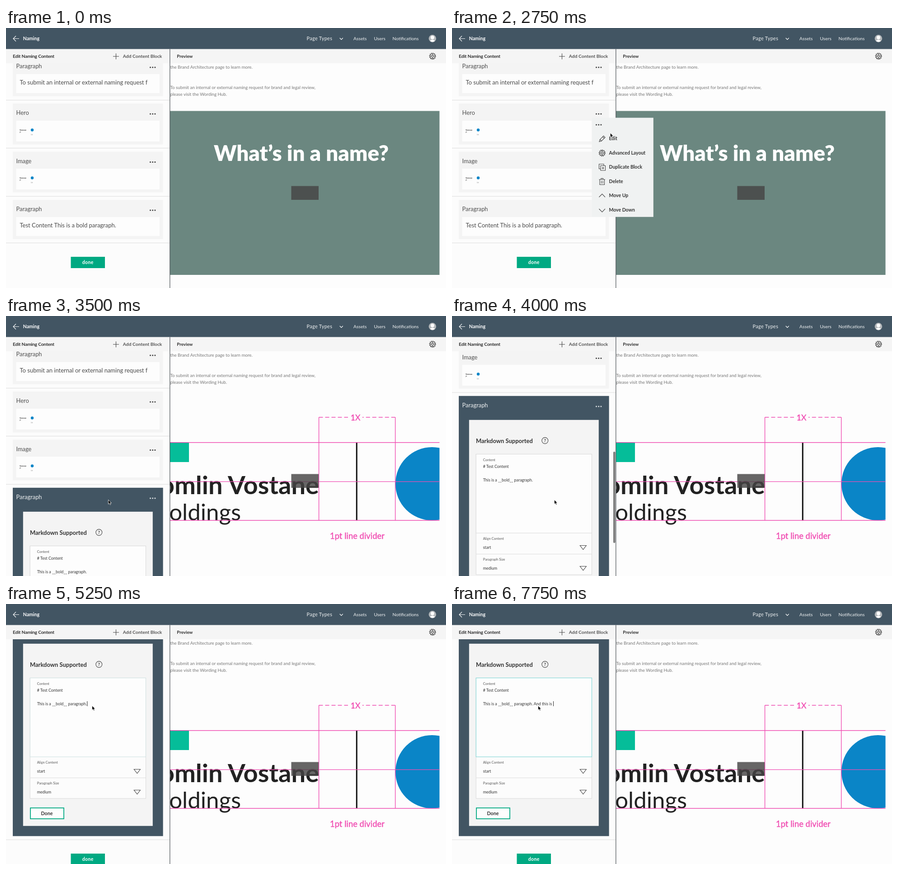
Animation, 974 px wide and 575 px high, one loop 8 s. Source, as an HTML page:

```html
<!DOCTYPE html>
<html lang="en">
<head>
<meta charset="utf-8">
<title>Content editor</title>
<style>
html, body { margin: 0; width: 100%; height: 100%; overflow: hidden; background: #fdfdfd; }
svg { display: block; width: 974px; height: 575px; font-family: Lato, "Open Sans", sans-serif; }
text { fill: #3d3d3d; white-space: pre; }
.nav { font-size: 10.3px; fill: #f1f3f4; }
.b { font-weight: 700; }
.title { font-size: 12.9px; fill: #505050; }
.body { font-size: 13px; fill: #4a4a4a; }
.copy { font-size: 9.75px; fill: #777; }
.label { font-size: 7.6px; fill: #555; }
.field { font-size: 8.9px; fill: #333; }
.item { font-size: 10.5px; font-weight: 700; fill: #333; }
.line { fill: none; stroke: #444; stroke-width: 1.1; }
.pink { fill: none; stroke: #f04db2; stroke-width: 1.4; }
.note { fill: #f04db2; stroke: #f04db2; stroke-width: .4; }
.rule { stroke: #dcdcdc; }
</style>
</head>
<body>
<svg viewBox="0 0 974 575">
<defs>
  <clipPath id="leftClip"><rect y="78" width="362" height="497"/></clipPath>
  <clipPath id="heroClip"><rect x="363" y="183" width="596.6" height="363"/></clipPath>
  <g id="dots"><circle cx="-5.2" r="1.6"/><circle r="1.6"/><circle cx="5.2" r="1.6"/></g>
  <g id="gear" class="line" stroke-width="1">
    <circle r="5.6"/><circle r="2.2"/>
    <circle r="6.9" style="stroke-width:1.5" stroke-dasharray="1.8 1.81"/>
    <path d="M-5.4 0H-2.2M2.2 0H5.4M0-5.4V-2.2M0 2.2V5.4"/>
  </g>
  <g id="thumb">
    <rect x="22.5" width="317.5" height="46" fill="#fdfdfd"/>
    <text x="30" y="22" class="b" font-size="4.2" style="fill:#222">Vostane</text>
    <text x="30" y="25.5" font-size="3.2" style="fill:#222">gs</text>
    <circle cx="58" cy="20.5" r="3.2" fill="#0a85c7"/>
    <text x="55" y="32" font-size="3.4" style="fill:#777">Lin</text>
  </g>
  <path id="drop" class="line" d="M-7-4.5H7L0 4.5Z"/>
</defs>

<rect width="974" height="575" fill="#fdfdfd"/>

<!-- preview pane -->
<text x="363.5" y="89.5" class="copy">the Brand Architecture page to learn more.</text>
<text x="363.5" y="135" class="copy">To submit an internal or external naming request for brand and legal review,</text>
<text x="363.5" y="150" class="copy">please visit the Wording Hub.</text>
<g clip-path="url(#heroClip)">
  <g id="hero">
    <rect x="363" y="183.5" width="597" height="362.5" fill="#6b8780"/>
    <text x="460" y="294" font-size="47.6" font-weight="900" style="fill:#fff">What’s in a name?</text>
  </g>
  <g id="diagram">
    <rect x="363" y="280" width="42" height="43" fill="#05bd99"/>
    <text x="693" y="394" class="b" font-size="56" text-anchor="end" style="fill:#222">Bromlin Vostane</text>
    <text x="520" y="452" font-size="51" text-anchor="end" style="fill:#222">Holdings</text>
    <circle cx="943" cy="371" r="81" fill="#0a85c7"/>
    <path d="M776.3 280V452" stroke="#111" stroke-width="3"/>
    <path class="pink" d="M363 279.8H960M363 366.4H960M363 452H960M692.6 224V452M861.7 224V452"/>
    <path class="pink" stroke-dasharray="9 5" d="M692.5 224H757M861.8 224H789"/>
    <text x="773.5" y="231" font-size="17.7" text-anchor="middle" class="note" style="fill:#f04db2">1X</text>
    <text x="717" y="493" font-size="18.4" class="note" style="fill:#f04db2">1pt line divider</text>
  </g>
  <rect x="631.5" y="349.5" width="60.5" height="30.5" fill="rgb(70,68,68)" fill-opacity=".81"/>
</g>

<!-- block list -->
<g clip-path="url(#leftClip)">
  <rect width="362" height="575" fill="#fcfcfc"/>
  <g id="list">
    <g fill="#f4f4f4">
      <rect x="15" y="60" width="332.6" height="91"/>
      <rect x="15" y="167" width="332.6" height="90.5"/>
      <rect x="15" y="273.5" width="332.6" height="90"/>
    </g>
    <path class="rule" d="M0 159.5H362M0 265.7H362M0 372.2H362"/>
    <rect x="22.5" y="102" width="317.5" height="42" fill="#fdfdfd"/>
    <text x="22.5" y="89" class="title">Paragraph</text>
    <text x="30.5" y="124.7" class="body">To submit an internal or external naming request f</text>
    <text x="22.5" y="192" class="title">Hero</text>
    <text x="22.5" y="298.5" class="title">Image</text>
    <use href="#thumb" y="205"/>
    <use href="#thumb" y="311"/>
    <g fill="#444">
      <use href="#dots" x="324.7" y="87"/>
      <use href="#dots" x="324.7" y="190"/>
      <use href="#dots" x="324.7" y="296.5"/>
    </g>

    <g id="closed">
      <rect x="15" y="380" width="332.6" height="87" fill="#f4f4f4"/>
      <rect x="22.5" y="418" width="317.5" height="42" fill="#fdfdfd"/>
      <text x="22.5" y="405" class="title">Paragraph</text>
      <text x="30.5" y="440.5" class="body">Test Content This is a bold paragraph.</text>
      <use href="#dots" x="324.7" y="403" fill="#444"/>
    </g>

    <g id="open">
      <rect x="15" y="379.8" width="332.6" height="478.5" fill="#425563"/>
      <text x="22.5" y="405" class="title" style="fill:#eef0f1">Paragraph</text>
      <use href="#dots" x="324.7" y="403" fill="#d5dadd"/>
      <rect x="37.8" y="432.8" width="287" height="403" fill="#f4f4f4"/>
      <text x="53" y="484" class="b" font-size="12.95" style="fill:#333">Markdown Supported</text>
      <circle class="line" cx="205.8" cy="478.5" r="6.9" stroke-width="1.3"/>
      <text x="205.8" y="482.2" class="b" font-size="10" text-anchor="middle">?</text>
      <rect x="53.2" y="508.5" width="256.3" height="266.5" fill="#fcfcfc" stroke="#d9d9d9"/>
      <path class="rule" d="M53.5 729.5H309.5"/>
      <rect id="area" x="53.2" y="508.5" width="256.3" height="174.5" fill="#fdfdfd"/>
      <text x="68.7" y="523.5" class="label">Content</text>
      <text x="68.7" y="538.7" class="field">#&#160;Test Content</text>
      <text id="typed" x="68.7" y="569" class="field"></text>
      <rect id="caret" y="560" width="1" height="11" fill="#222"/>
      <text x="68.7" y="698" class="label">Align Content</text>
      <text x="68.7" y="717.5" class="field">start</text>
      <text x="68.7" y="744" class="label">Paragraph Size</text>
      <text x="68.7" y="763.5" class="field">medium</text>
      <use href="#drop" x="290.3" y="715"/>
      <use href="#drop" x="290.3" y="761"/>
      <rect x="54" y="796" width="74" height="24" fill="#fdfdfd" stroke="#00a982" stroke-width="1.8"/>
      <text x="90.5" y="812" class="b" font-size="10.7" text-anchor="middle" style="fill:#333">Done</text>
    </g>

    <g id="foot">
      <path class="rule" d="M0 475.3H362"/>
      <rect x="143.5" y="506" width="75.5" height="25" fill="#00a982"/>
      <text x="181.2" y="522.3" class="b" font-size="10.6" letter-spacing=".3" text-anchor="middle" style="fill:#fff">done</text>
    </g>
  </g>
  <rect id="bar" x="357" width="4.5" height="202" rx="2.2" fill="#7c7c7c"/>
</g>

<!-- top bars -->
<rect y="46" width="974" height="32" fill="#f5f5f5"/>
<rect width="974" height="46.5" fill="#425563"/>
<path d="M362.8 46.5V575" stroke="#555b60" stroke-width="1.3"/>
<path d="M29 23.5H16M22 17.5L16 23.5L22 29.5" fill="none" stroke="#f1f3f4" stroke-width="1.2"/>
<text x="37.8" y="27" class="b" font-size="10.5" style="fill:#fff">Naming</text>
<text x="665.5" y="27.3" class="nav" style="font-size:11px" letter-spacing=".3">Page Types</text>
<path d="M738.8 22L742.3 25.6L745.8 22" fill="none" stroke="#fff" stroke-width="1.2"/>
<text x="769" y="27.2" class="nav">Assets</text>
<text x="814.5" y="27.2" class="nav">Users</text>
<text x="855.5" y="27.2" class="nav">Notifications</text>
<circle cx="944" cy="23.3" r="8.2" fill="#b4b8bb"/>
<circle cx="944" cy="21" r="3.9" fill="#fff"/>
<path d="M938.6 28.6Q944 22.8 949.4 28.6Q944 33 938.6 28.6Z" fill="#fff"/>
<text x="15" y="66.3" class="b" font-size="10.3" letter-spacing="-.2" style="fill:#2e2e2e">Edit Naming Content</text>
<path class="line" d="M237 62.7H250M243.5 56.2V69.2"/>
<text x="258.8" y="66" class="b" font-size="10.3" style="fill:#555">Add Content Block</text>
<text x="378.3" y="66.3" class="b" font-size="9.75" style="fill:#2e2e2e">Preview</text>
<use href="#gear" x="944.3" y="62.3"/>

<!-- block menu -->
<g id="menu">
  <rect x="309.5" y="198.5" width="136.3" height="219.3" fill="#f0f2f2"/>
  <use href="#dots" x="324.7" y="214" fill="#444"/>
  <path class="line" d="M326 251.5L327.5 246.5L335.5 238.5L339 242L331 250ZM333.5 240.5L337 244M327.5 246.5L331 250"/>
  <use href="#gear" x="332.3" y="276.5"/>
  <path class="line" d="M329 311.5H325.5V301H336V304.5M329 304.5H339.5V315H329ZM334.2 307V312.5M331.5 309.8H337"/>
  <path class="line" d="M325.5 335H339M330 335V332.5H334.5V335M327 335V346.5H337.5V335M330.5 338V344M334 338V344"/>
  <path class="line" d="M325.5 374L332.3 367L339 374M325.5 400L332.3 407L339 400"/>
  <g id="items"></g>
</g>

<path id="cursor" d="M0 0V9.6L2.2 7.6L3.8 11L5.5 10.2L4 7H6.9Z" fill="#000" stroke="#fff" stroke-width=".8"/>
</svg>
<script>
const LOOP = 8000, STEP = 250;
const $ = id => document.getElementById(id);
const show = (id, on) => { $(id).style.display = on ? '' : 'none'; };

['Edit', 'Advanced Layout', 'Duplicate Block', 'Delete', 'Move Up', 'Move Down'].forEach((label, i) => {
  const item = document.createElementNS('http://www.w3.org/2000/svg', 'text');
  item.setAttribute('class', 'item');
  item.setAttribute('x', 347.5);
  item.setAttribute('y', 248 + i * 31.5);
  item.textContent = label;
  $('items').append(item);
});

// Each key: time, then values
const path = [
  [500, 233, 418], [1000, 295, 408], [1500, 324, 402], [1750, 320.8, 408.8],
  [2250, 340, 305], [2750, 350.3, 232], [3250, 350.3, 232], [3500, 226.5, 406.5],
  [4500, 226.5, 406.5], [5000, 190.6, 225], [8000, 190.6, 225]
];
const scroll = [[3500, 0], [3750, 75], [4000, 203], [4250, 275], [4500, 325], [4750, 345]];
const typing = [[5500, 0], [6750, 10], [7000, 11], [7250, 11], [7500, 12], [7750, 13]];

function at(keys, t) {
  if (t <= keys[0][0]) return keys[0].slice(1);
  for (let i = 1; i < keys.length; i++) {
    const a = keys[i - 1], b = keys[i];
    if (t <= b[0]) {
      const k = (t - a[0]) / (b[0] - a[0]);
      return a.slice(1).map((v, j) => v + (b[j + 1] - v) * k);
    }
  }
  return keys[keys.length - 1].slice(1);
}

function draw(now) {
  const t = Math.floor(now % LOOP / STEP) * STEP;
  const editing = t >= 3250, swapped = t >= 3500;
  const [x, y] = at(path, t);
  const [offset] = at(scroll, t);

  show('cursor', t >= 500);
  $('cursor').setAttribute('transform', `translate(${x} ${y})`);
  show('menu', t >= 1750 && !editing);
  show('closed', !editing);
  show('open', editing);
  show('hero', !swapped);
  show('diagram', swapped);
  $('foot').setAttribute('transform', `translate(0 ${editing ? 391 : 0})`);
  $('list').setAttribute('transform', `translate(0 ${-offset})`);
  show('bar', t >= 3750 && t < 5000);
  $('bar').setAttribute('y', 300 + (offset - 203) * .406);

  const count = Math.round(at(typing, t)[0]);
  $('typed').textContent = 'This is a __bold__ paragraph.' + ' And this is '.slice(0, count);
  show('caret', t >= 5250);
  if (t >= 5250) $('caret').setAttribute('x', 69.2 + $('typed').getComputedTextLength());
  $('area').setAttribute('stroke', t >= 5500 ? '#74d3d3' : t >= 5250 ? '#cddfdf' : '#d9d9d9');
}

const start = performance.now();
function tick() {
  draw(performance.now() - start);
  requestAnimationFrame(tick);
}
tick();
</script>
</body>
</html>
```
